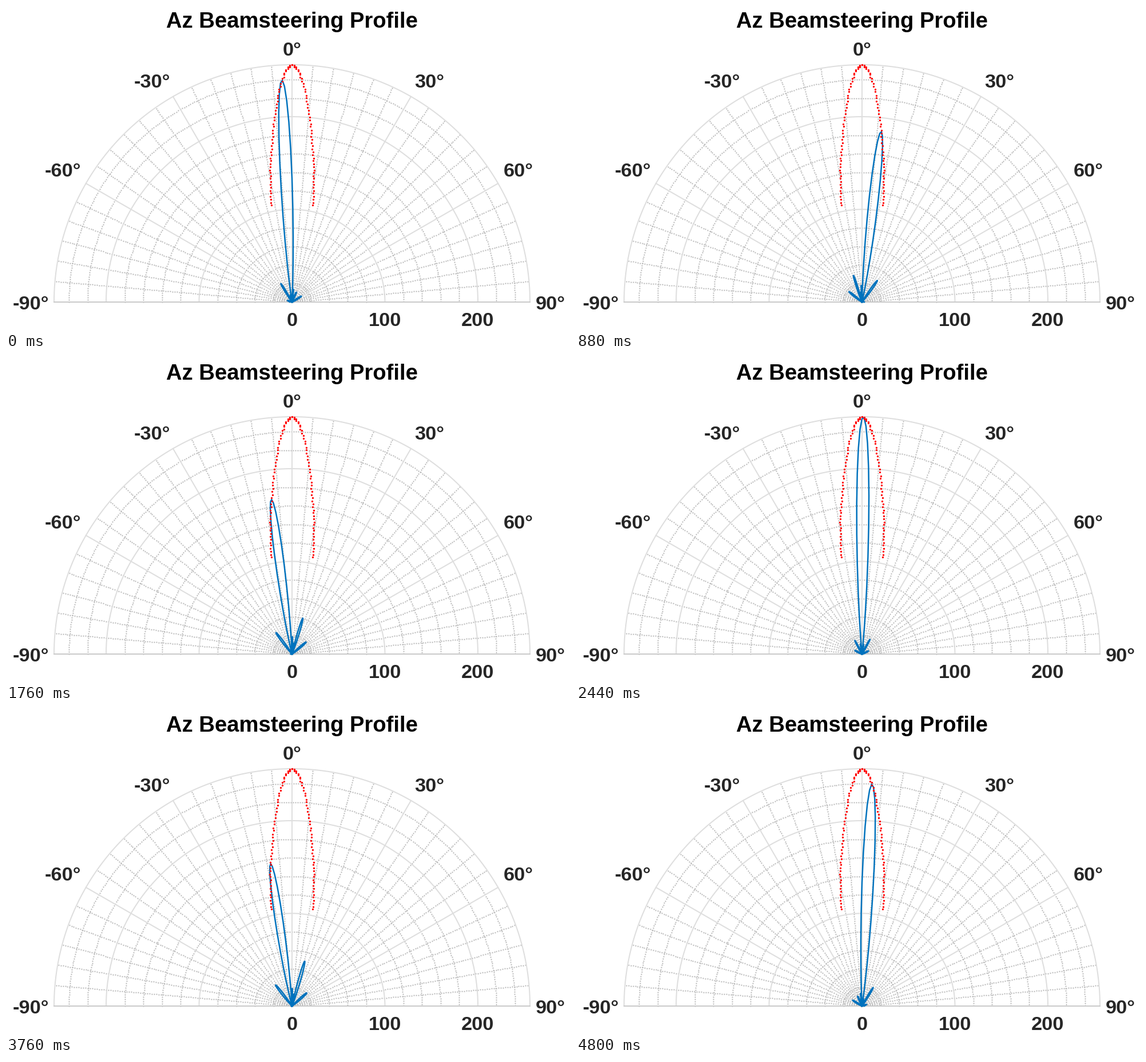
A matplotlib script for the animation above (4.82 s loop, 986 by 568 pixels).

```python
import numpy as np
import matplotlib.pyplot as plt
from matplotlib.animation import FuncAnimation

W, H, DPI = 986, 568, 100
PX = 72 / DPI                      # points per pixel
FRAMES, INTERVAL = 241, 20
CX, CY, RADIUS = 500, 519, 416
UNIT = RADIUS / 256
BLUE, RED, SOLID, DOTTED, INK = "#0072BD", "#ff0000", "#dedede", "#b2b2b2", "#262626"

ELEMENTS, LOBE_GAP = 4, 0.456      # lobe spacing in sin(angle)
ANGLES = np.radians(np.linspace(-90, 90, 361))
SINES = np.sin(ANGLES)

# Steering position, unwrapped over the repeated sweeps
STEER_FRAMES = [0, 44, 88, 122, 147, 188, 216, 240]
STEER_SINES = [-0.0505, 0.1207, 0.3144, 0.462, 0.571, 0.7535, 0.874, 0.9625]


def envelope(x):
    """Power of one subarray: a sinc main lobe and a broad outer lobe."""
    x = np.abs(x)
    dip = np.where(x < 0.24, 0.038 * np.sin(np.pi * x / 0.24) ** 2, 0)
    main = np.where(x < 0.437, np.sinc(x / 0.437) - dip, 0) ** 2
    spread = np.where(x < 0.6, 0.19, 0.27)
    outer = 0.113 * np.exp(-((x - 0.6) / spread) ** 2)
    return main + np.where(x < 0.2, 0, outer)


ENVELOPE = envelope(SINES)


def pattern(steer):
    phase = np.pi * (SINES - steer) / LOBE_GAP + 1e-9
    factor = np.sin(ELEMENTS * phase) / (ELEMENTS * np.sin(phase))
    return np.minimum(ENVELOPE * factor ** 2, 1)


def polar(angle, r):
    return CX + r * np.sin(angle), CY - r * np.cos(angle)


fig = plt.figure(figsize=(W / DPI, H / DPI), dpi=DPI, facecolor="white")
ax = fig.add_axes([0, 0, 1, 1])
ax.set_xlim(0, W)
ax.set_ylim(H, 0)
ax.axis("off")


def draw_grid():
    step = 4
    dots = []
    for value in range(20, 256, 20):
        if value % 100:
            r = value * UNIT
            dots.append(polar(np.arange(-np.pi / 2, np.pi / 2, step / r), r))
    for deg in range(-85, 90, 5):
        if deg % 30:
            dots.append(polar(np.radians(deg), np.arange(2, RADIUS, step)))
    x, y = np.concatenate(dots, axis=1)
    ax.plot(x, y, "s", ms=1.9 * PX, mew=0, color=DOTTED, zorder=1)

    arc = np.linspace(-np.pi / 2, np.pi / 2, 300)
    for r in (100 * UNIT, 200 * UNIT, RADIUS):
        ax.plot(*polar(arc, r), color=SOLID, lw=2 * PX, zorder=2)
    for deg in range(-60, 90, 30):
        ax.plot(*polar(np.radians(deg), np.array([0, RADIUS])),
                color=SOLID, lw=2 * PX, zorder=2)
    ax.plot([CX - RADIUS, CX + RADIUS], [CY, CY], color="#cacaca",
            lw=2 * PX, zorder=2)


def label(x, baseline, text, size=34.4, color=INK):
    ax.text(x, baseline, text, family="Liberation Sans", weight="bold",
            size=size * PX, color=color, ha="center", va="baseline", zorder=5)


def draw_labels():
    label(500, 38, "Az Beamsteering Profile", 38.3, "black")
    for x, y, text in [(500.5, 87, "0°"), (255.5, 143, "-30°"), (740, 143, "30°"),
                       (99.5, 299, "-60°"), (895.5, 299, "60°"),
                       (43, 532, "-90°"), (952, 532, "90°"),
                       (500, 561, "0"), (662.5, 561, "100"), (824.5, 561, "200")]:
        label(x, y, text)


def draw_peaks():
    """Trace the peak of the main lobe over one full sweep."""
    points = []
    for steer in np.linspace(-0.222, 0.222, 108):
        power = np.where(np.abs(SINES - steer) < 0.1, pattern(steer), 0)
        best = power.argmax()
        points.append(polar(ANGLES[best], RADIUS * power[best]))
    x, y = np.transpose(points)
    ax.plot(x, y, "o", ms=3.3 * PX, mew=0, color=RED, zorder=4)


draw_grid()
draw_labels()
draw_peaks()
beam, = ax.plot([], [], color=BLUE, lw=2.5 * PX, solid_joinstyle="round", zorder=3)


def update(i):
    steer = np.interp(i, STEER_FRAMES, STEER_SINES)
    beam.set_data(*polar(ANGLES, RADIUS * pattern(steer)))
    return beam,


anim = FuncAnimation(fig, update, frames=FRAMES, interval=INTERVAL,
                     repeat=True, repeat_delay=0)
plt.show()
```
